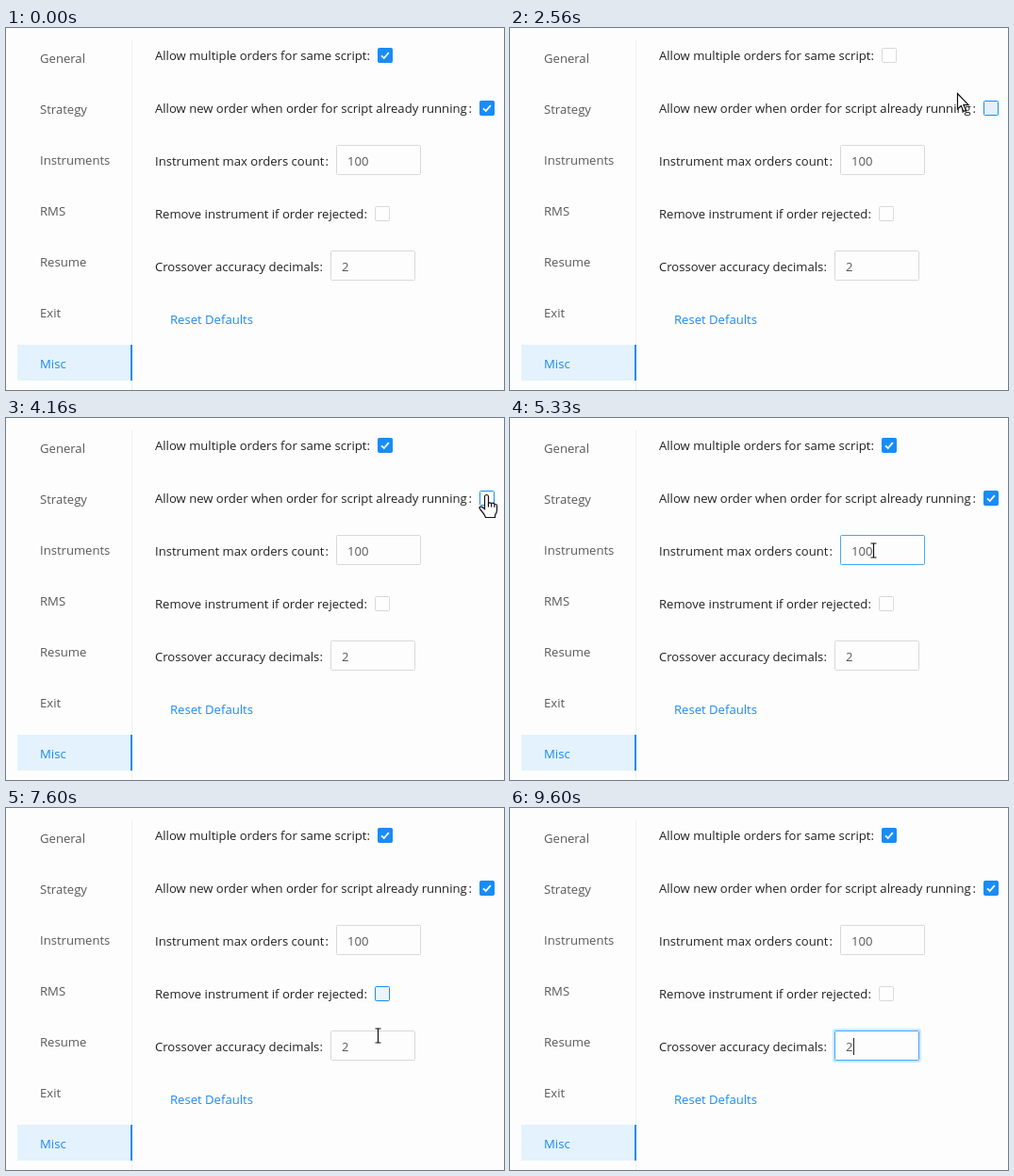
Animation, 528 px wide and 384 px high, one loop 9620 ms. Source, as an HTML page with a canvas:

```html
<!DOCTYPE html>
<html lang="en">
<head>
<meta charset="utf-8">
<title>Settings</title>
<style>
  html, body { margin: 0; width: 100%; height: 100%; overflow: hidden; background: #fdfdfd; }
  canvas { display: block; }
</style>
</head>
<body>
<canvas id="stage" width="528" height="384"></canvas>
<script>
const ctx = document.getElementById('stage').getContext('2d');
const LOOP = 9620, BLUE = '#1b8af2', GREY = '#d9d9d9', INK = '#222';

const menu = ['General', 'Strategy', 'Instruments', 'RMS', 'Resume', 'Exit', 'Misc'];

// check: [time, amount] pairs; lit: [from, to] spans with a blue border
const rows = [
  { label: 'Allow multiple orders for same script', x: 394,
    check: [[0, 1], [1400, 1], [1700, 0], [3360, 0], [3560, 1]], lit: [[580, 2100], [2950, 4100]] },
  { label: 'Allow new order when order for script already running', x: 502,
    check: [[0, 1], [2330, 1], [2590, 0], [4360, 0], [4560, 1]], lit: [[1600, 2950], [3980, 4700]] },
  { label: 'Instrument max orders count', x: 350, value: '100',
    lit: [[4900, 6500]], focus: [5400, 6500] },
  { label: 'Remove instrument if order rejected', x: 391,
    check: [[0, 0], [6520, 0], [6720, 1], [7380, 1], [7620, 0]], lit: [[6000, 8000]] },
  { label: 'Crossover accuracy decimals', x: 344, value: '2',
    lit: [[7700, LOOP]], focus: [8360, LOOP] },
];

// Cursor path: time, x, y, shape from that time on
const path = [
  [110, 421, 334, 'arrow'], [190, 423, 268, 'beam'], [235, 424, 235, 'arrow'],
  [330, 420, 156, 'beam'], [370, 415, 123, 'arrow'], [580, 406, 36, 'hand'], [670, 403, 28, 'hand'],
  [1150, 403, 28, 'arrow'], [1400, 460, 48, 'arrow'], [1600, 516, 71, 'hand'], [1620, 518, 73, 'hand'],
  [1840, 517, 80, 'hand'], [1930, 517, 80, 'hand'], [2000, 510, 82, 'hand'],
  [2330, 510, 82, 'arrow'], [2560, 474, 69, 'arrow'], [2950, 408, 34, 'hand'], [3090, 396, 26, 'hand'],
  [3450, 396, 26, 'arrow'], [3980, 500, 78, 'hand'], [4090, 510, 82, 'hand'],
  [4450, 510, 82, 'arrow'], [4900, 425, 125, 'beam'], [5110, 385, 140, 'beam'],
  [5450, 385, 140, 'beam'], [5650, 390, 157, 'arrow'], [6080, 400, 203, 'arrow'],
  [6480, 400, 203, 'hand'], [7380, 400, 203, 'arrow'], [7570, 395, 235, 'beam'],
  [7600, 394, 241, 'beam'], [8130, 388, 252, 'beam'], [8460, 388, 252, 'beam'],
  [8650, 395, 269, 'arrow'], [9110, 440, 390, 'arrow'],
];

const clicks = [[890, 402, 29], [2160, 510, 82], [3160, 395, 26], [4160, 510, 82],
  [5150, 385, 140], [6245, 400, 203], [7180, 400, 201], [8170, 388, 252]];

const arrow = new Path2D('M0 0V16.5L3.8 13L6.4 19L9 17.9L6.4 12.2H11.6Z');
const hand = new Path2D('M-3 14V1a2 2 0 0 1 4 0V8q1.2-1.2 3.2 0q1.8-.8 3.2 .8q2.6-.4 2.6 2.2' +
  'V15q0 3-2 5.5v2.5H-2q-1-3-3.2-5.5q-2.5-2.5-3.5-5q1.5-2.5 5.7 1.5z');
const knuckles = new Path2D('M1 8v4M4.2 8.5v3.5M7.4 9.3v3');
const beam = new Path2D('M-3-7.5h2.5l.5.5l.5-.5H3M0-7V7M-3 7.5h2.5l.5-.5l.5.5H3');

// Linear interpolation of the column `col` in keys sorted by time
function sample(keys, t, col) {
  const next = keys.findIndex(key => key[0] > t);
  if (next < 0) return keys[keys.length - 1][col];
  const a = keys[Math.max(next - 1, 0)], b = keys[next];
  return a[col] + (b[col] - a[col]) * Math.max(0, (t - a[0]) / (b[0] - a[0]));
}

const within = (t, [from, to]) => t >= from && t < to;

function text(str, x, y, color) {
  ctx.fillStyle = color;
  ctx.fillText(str, x, y);
}

function box(x, y, w, h, fill, border) {
  ctx.beginPath();
  ctx.roundRect(x + 0.5, y + 0.5, w - 1, h - 1, 1);
  ctx.fillStyle = fill;
  ctx.fill();
  ctx.lineWidth = 1;
  ctx.strokeStyle = border;
  ctx.stroke();
}

function drawMenu() {
  ctx.fillStyle = '#efefef';
  ctx.fillRect(133, 13, 1, 371);
  ctx.fillStyle = '#e3f2fc';
  ctx.fillRect(12, 336, 120, 38);
  ctx.fillStyle = BLUE;
  ctx.fillRect(132, 336, 2, 38);
  menu.forEach((name, i) => text(name, 36, 37 + i * 54, name === 'Misc' ? BLUE : '#595959'));
}

function drawCheckbox(row, y, t, lit) {
  const amount = sample(row.check, t, 1);
  const shade = [24, 140, 248].map(c => Math.round(254 + (c - 254) * amount));
  box(row.x, y - 8, 16, 16, `rgb(${shade})`, lit || amount > 0.5 ? BLUE : GREY);
  const rising = amount === 1 || amount > 0 && sample(row.check, t + 10, 1) > amount;
  if (!rising) return;
  ctx.beginPath();
  ctx.moveTo(row.x + 4, y + 0.3);
  ctx.lineTo(row.x + 6.8, y + 3);
  ctx.lineTo(row.x + 11.8, y - 2.8);
  ctx.lineWidth = 1.8;
  ctx.strokeStyle = '#fff';
  ctx.stroke();
}

function drawInput(row, y, t, lit) {
  const focused = within(t, row.focus);
  if (focused) {
    ctx.fillStyle = 'rgba(24,144,255,.2)';
    ctx.beginPath();
    ctx.roundRect(row.x - 2, y - 19, 94, 36, 3);
    ctx.fill();
  }
  box(row.x, y - 17, 90, 32, '#fdfdfd', lit ? '#40a9ff' : GREY);
  text(row.value, row.x + 12, y + 5, '#595959');
  if (focused && (t - row.focus[0]) % 1060 < 530) {
    ctx.fillStyle = INK;
    ctx.fillRect(row.x + 13 + Math.round(ctx.measureText(row.value).width), y - 9, 1, 18);
  }
}

function drawRipples(t) {
  for (const [start, x, y] of clicks) {
    const u = (t - start) / 305;
    if (u < 0 || u > 1) continue;
    ctx.fillStyle = `rgba(250,236,50,${0.9 * (1 - u ** 4)})`;
    ctx.beginPath();
    ctx.arc(x, y, 25 * u, 0, 2 * Math.PI);
    ctx.fill();
  }
}

function drawCursor(t) {
  if (t < path[0][0] || t > path[path.length - 1][0]) return;
  const shape = path.filter(key => key[0] <= t).pop()[3];
  ctx.save();
  ctx.translate(Math.round(sample(path, t, 1)), Math.round(sample(path, t, 2)));
  ctx.translate(0.5, 0.5);
  ctx.lineWidth = 1.2;
  ctx.strokeStyle = '#111';
  ctx.fillStyle = '#fff';
  if (shape === 'beam') {
    ctx.stroke(beam);
  } else {
    const outline = shape === 'hand' ? hand : arrow;
    ctx.fill(outline);
    ctx.stroke(outline);
    if (shape === 'hand') ctx.stroke(knuckles);
  }
  ctx.restore();
}

function draw(t) {
  ctx.fillStyle = '#fdfdfd';
  ctx.fillRect(0, 0, 528, 384);
  ctx.font = '13.1px "Open Sans", sans-serif';
  drawMenu();
  drawRipples(t);
  rows.forEach((row, i) => {
    const y = 29 + i * 56;
    const lit = row.lit.some(span => within(t, span));
    text(row.label, 158, y + 5, INK);
    text(':', row.x - 11.5, y + 5, INK);
    (row.check ? drawCheckbox : drawInput)(row, y, t, lit);
  });
  text('Reset Defaults', 174, 314, BLUE);
  drawCursor(t);
}

const begin = performance.now();
function tick() {
  draw((performance.now() - begin) % LOOP);
  requestAnimationFrame(tick);
}
tick();
</script>
</body>
</html>
```
